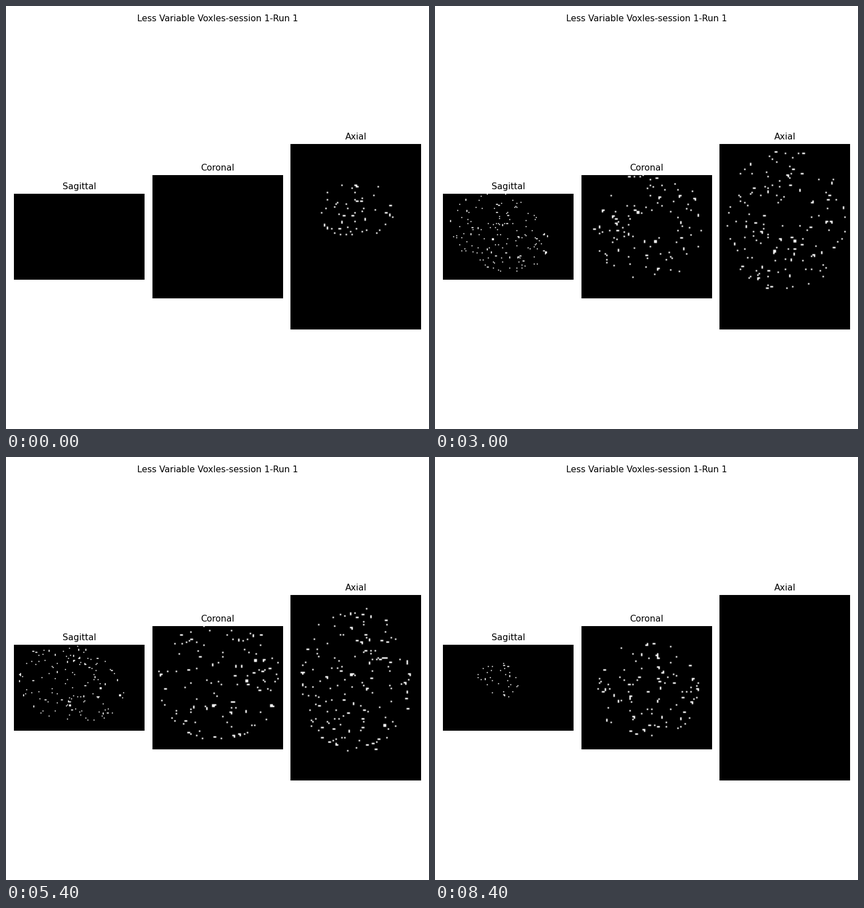
A matplotlib script for the animation above (8500 ms loop, 748x748 px).

```python
import numpy as np
import matplotlib.pyplot as plt
from matplotlib.animation import FuncAnimation

STAGE = 748
DPI = 93.5
FONT = 11.9
NX, NY, NZ = 90, 128, 85


def profile(z, widest, below, above, power):
    """Relative half-width of the head at height z, 1 at the widest level."""
    u = np.abs(z - widest) / np.where(z < widest, below, above)
    return np.clip(1 - u ** power, 0, 1) ** (1 / power)


def head_radius():
    """Normalised distance from the head axis; 1 is the surface."""
    x, y, z = np.ogrid[:NX, :NY, :NZ]
    half_x = 41 * profile(z, 32, 37.5, 46.5, 2.4) + 0.5
    half_y = 51 * profile(z, 47, 50.5, 31.5, 2) + 0.5
    mid_x, mid_y = 45, 45 + z / 4
    power = 2.2
    r = (np.abs((x - mid_x) / half_x) ** power
         + np.abs((y - mid_y) / half_y) ** power) ** (1 / power)
    return np.where(z <= 78, r, 9)


def grow(cells, shares, rng):
    """Give a share of the cells a neighbour along each axis."""
    out = cells.copy()
    for axis, share in enumerate(shares):
        out |= np.roll(out & (rng.random(out.shape) < share), 1, axis)
    return out


def make_volume():
    rng = np.random.default_rng(11)
    r = head_radius()
    inside = r <= 1
    gain = 1 + 0.4 * (np.arange(NZ) / 39 - 1) ** 2
    chance = (0.0165 + 0.008 * (r > 0.9)) * gain
    seeds = inside & (rng.random(r.shape) < chance)
    lumps = inside & (rng.random(r.shape) < 0.0004)
    volume = grow(seeds, (0.22, 0.1, 0.1), rng) | grow(lumps, (0.9, 0.6, 0.6), rng)
    return (volume & inside).astype(float)


volume = make_volume()


def slices(i):
    return volume[i].T, volume[:, i].T, volume[:, :, i].T


fig = plt.figure(figsize=(STAGE / DPI, STAGE / DPI), dpi=DPI, facecolor="white")
fig.suptitle("Less Variable Voxles-session 1-Run 1", fontsize=FONT)

PAD = 10.8 * DPI / 72
WIDTH = (STAGE - 4 * PAD) / 3
MIDDLE = STAGE - 408

images = []
for k, (name, data) in enumerate(zip(("Sagittal", "Coronal", "Axial"), slices(0))):
    rows, cols = data.shape
    height = 2 * int(WIDTH * rows / cols / 2 + 0.15)  # whole, even pixels
    left = PAD + k * (WIDTH + PAD)
    box = [left, MIDDLE - height / 2, WIDTH, height]
    ax = fig.add_axes([v / STAGE for v in box])
    ax.set_title(name, fontsize=FONT)
    ax.axis("off")
    images.append(ax.imshow(data, cmap="gray", vmin=0, vmax=1, aspect="auto"))


def update(i):
    for image, data in zip(images, slices(i)):
        image.set_data(data)
    return images


anim = FuncAnimation(fig, update, frames=NZ, interval=100, repeat=True,
                     repeat_delay=0, blit=False)
plt.show()
```
